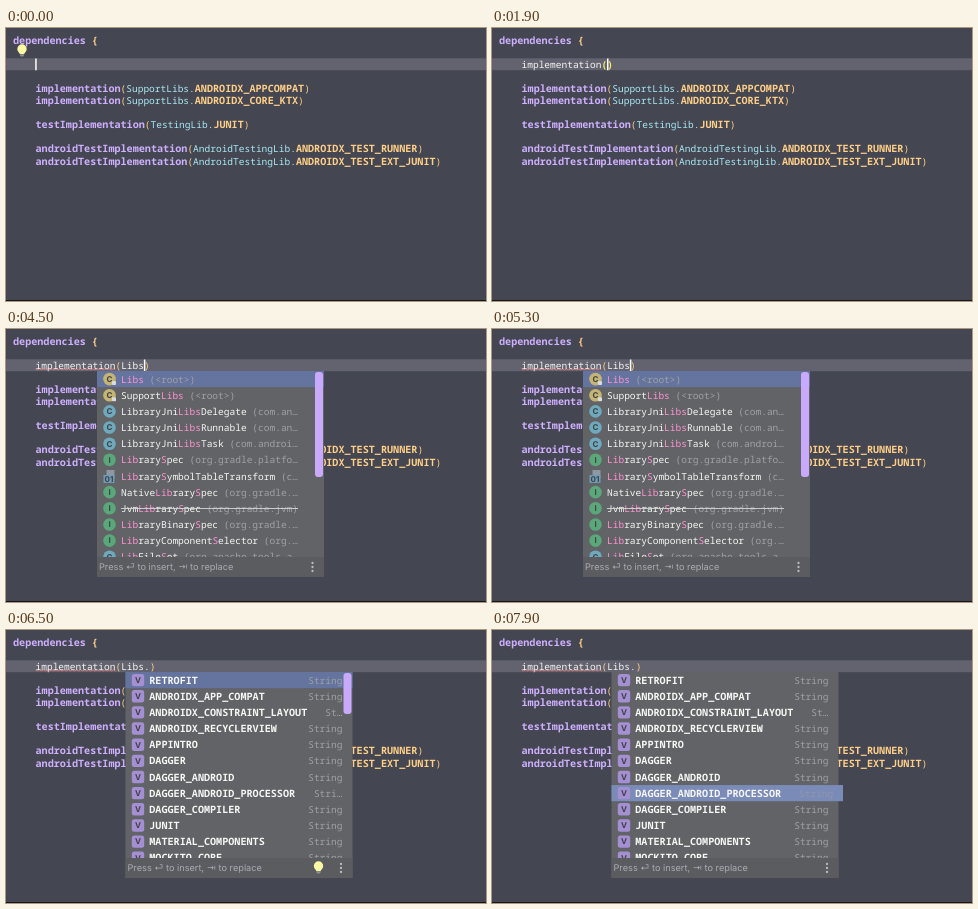
Recreate the animation shown at these times as an HTML page. Size 480 by 273 pixels, loop 8 s.

```html
<!DOCTYPE html>
<html lang="en">
<head>
<meta charset="utf-8">
<title>Dependency completion</title>
<style>
html, body { margin: 0; width: 100%; height: 100%; overflow: hidden; background: #444651; }
svg { display: block; width: 100vw; height: 100vh; }
text { font: 9.53px "Noto Sans Mono", "DejaVu Sans Mono", monospace; white-space: pre; fill: #f6f6f4; text-rendering: geometricPrecision; }
.key { font-size: 10.15px; font-weight: 700; fill: #ceb0ff; }
.type { fill: #a9e9f4; }
.const { font-size: 10.15px; font-weight: 700; fill: #ffcf88; }
.paren { fill: #ffd083; }
.brace { fill: #ffef62; font-weight: 700; }
.item { font-size: 10.15px; font-weight: 700; }
.hit { fill: #ff92d2; }
.dim { fill: #a0a1a4; }
.faint { fill: #8f96ab; }
.hint { font: 9.2px Inter, Roboto, sans-serif; fill: #a9abb0; }
.badge { font: 700 8px Inter, Roboto, sans-serif; text-anchor: middle; fill: #3f4348; }
</style>
</head>
<body>
<svg id="stage" viewBox="0 0 480 273" preserveAspectRatio="none"></svg>
<script>
const LOOP = 8000, STEP = 100;
const CHAR = 5.72, LEFT = 29.5, ROW = 16.15, TOP = 42, LIST_END = 228, WIDE = 227;
const stage = document.getElementById('stage');

const esc = s => s.replace(/&/g, '&amp;').replace(/</g, '&lt;').replace(/>/g, '&gt;');
const span = (cls, s) => `<tspan class="${cls}">${esc(s)}</tspan>`;
const text = (x, y, body, cls = '') => `<text x="${x}" y="${y}" class="${cls}">${body}</text>`;
const rect = (x, y, w, h, fill, more = '') =>
  `<rect x="${x}" y="${y}" width="${w}" height="${h}" fill="${fill}" ${more}/>`;
const group = (id, body, more = '') => `<g id="${id}" ${more}>${body}</g>`;
const baseline = line => 15.5 + 12.1 * line;

function call(line, name, type, constant) {
  return text(LEFT, baseline(line), span('key', name) + span('paren', '(') +
    span('type', type + '.') + span('const', constant) + span('paren', ')'));
}

function bulb(id, x, y) {
  return group(id, `<circle cx="${x}" cy="${y}" r="4.7" fill="#fdf8a4"/>` +
    rect(x - 2.4, y + 3.2, 4.8, 2, '#fdf8a4') + rect(x - 2, y + 5.4, 4, 2, '#8d8f94', 'rx=".8"'));
}

// Popup pieces
function frame(x, height) {
  return rect(x, TOP, WIDE, height, '#616366') + rect(x, TOP + height - 20, WIDE, 20, '#5a5c60');
}

function footer(x, y) {
  const dots = [-4, 0, 4].map(d =>
    `<circle cx="${x + 215.5}" cy="${y + d}" r="1.15" fill="#b9babd"/>`).join('');
  return text(x + 2, y + 3.2, 'Press ⏎ to insert, ⇥ to replace', 'hint') + dots;
}

const selection = x => rect(x, TOP, WIDE, ROW, '#64749f');
const rowMid = i => TOP + ROW * (i + 0.5);
const thumb = (id, x, h) => rect(x + 218, TOP + 1, 8, h, '#c9a9fb', `rx="3" id="${id}"`);

function icon(kind, x, y) {
  if (kind === 'v') return rect(x - 6.2, y - 6.2, 12.4, 12.4, '#a48fd2', 'rx="2.5"') +
    text(x, y + 2.9, 'V', 'badge');
  if (kind === '0') return `<path d="M${x - 3} ${y - 6}h8v8h-8z" fill="#8d98a3"/>` +
    rect(x - 6, y - 1, 11, 8, '#6f9bb5') + text(x - .5, y + 6, '01', 'badge');
  const fill = { C: '#6fa9bd', K: '#c5b574', I: '#5aa779', f: '#b98cc9' }[kind];
  const mark = kind === 'K' ? 'C' : kind;
  return `<circle cx="${x}" cy="${y}" r="6.3" fill="${fill}"/>` + text(x, y + 2.9, mark, 'badge') +
    (kind === 'K' ? rect(x + 2.5, y + 2, 4, 4, '#d9dadc', 'rx=".8"') : '');
}

// Stars enclose matched letters; the tail after the first blank is dimmed.
function suggestion(x, row, i) {
  const kind = row[0], [name, tail] = row.slice(2).split(' ');
  const y = rowMid(i);
  const body = name.split('*').map((s, n) => span(n % 2 ? 'hit' : '', s)).join('');
  return icon(kind, x + 12.5, y) + text(x + 24, y + 3.6, body + span('dim', tail ? ' ' + tail : ''));
}

const clipped = body => `<g clip-path="url(#list)">${body}</g>`;

function classList(id, x, rows, extra = '') {
  return group(id, frame(x, 206) + selection(x) +
    clipped(rows.map((r, i) => suggestion(x, r, i)).join('') + extra) + footer(x, 238));
}

const firstRows = [
  'f *imp*lementation(dependency)', 'f *imp*lementation(group,name)', 'f *imp*ort(path)',
  'C *Imp*ortOrder (org.gradle.…', 'I *Imp*ortSpec (org.gradle.…', 'C *Imp*lSupport (org.gradle.…',
  'I *Imp*ortFilter (org.gradle…', 'C *Imp*lLoader (org.gradle.…', 'I *Imp*licitSpec (org.gradle…',
  'C *Imp*ortTask (org.gradle.…', 'I *Imp*lProvider (org.gradle…', 'C *Imp*ortSet (org.apache.t…'
];
const libRows = [
  'K *Libs* (<root>)', 'K Support*Libs* (<root>)', 'C LibraryJni*Libs*Delegate (com.an…',
  'C LibraryJni*Libs*Runnable (com.an…', 'C LibraryJni*Libs*Task (com.androi…',
  'I *Lib*rary*S*pec (org.gradle.platfo…', '0 *Lib*rary*S*ymbolTableTransform (c…',
  'I Native*Lib*rary*S*pec (org.gradle.…', 'I Jvm*Lib*rary*S*pec (org.gradle.jvm)',
  'I *Lib*raryBinary*S*pec (org.gradle.…', 'I *Lib*raryComponent*S*elector (org.…',
  'C *Lib*File*S*et (org.apache.tools.a…'
];
const fields = ['RETROFIT', 'ANDROIDX_APP_COMPAT', 'ANDROIDX_CONSTRAINT_LAYOUT',
  'ANDROIDX_RECYCLERVIEW', 'APPINTRO', 'DAGGER', 'DAGGER_ANDROID', 'DAGGER_ANDROID_PROCESSOR',
  'DAGGER_COMPILER', 'JUNIT', 'MATERIAL_COMPONENTS', 'MOCKITO_CORE'];
const cut = { 2: 'St…', 7: 'Stri…' };

function fieldRow(name, i) {
  const y = rowMid(i), kind = cut[i] || 'String';
  return icon('v', 132, y) + text(143.3, y + 3.6, name, 'item') +
    text(336.5 - kind.length * CHAR, y + 3.6, kind, 'dim" id="kind' + i);
}

const wave = Array.from({ length: 40 }, (_, i) => `${LEFT + i * 2.05},${i % 2 ? 40.9 : 39.9}`).join(' ');
const spokes = Array.from({ length: 8 }, (_, i) =>
  `<path d="M0-3v-3" stroke="#8fe3a2" stroke-width="1.3" stroke-linecap="round"
    opacity="${0.3 + i * 0.1}" transform="rotate(${i * 45})"/>`).join('');

stage.innerHTML =
  `<clipPath id="list">${rect(0, TOP, 480, LIST_END - TOP, '#000')}</clipPath>` +
  rect(0, 0, 480, 273, '#444651') + rect(0, 30.3, 480, 11.9, '#62636f') +
  text(7, baseline(0), span('key', 'dependencies') + span('', ' ') + span('const', '{')) +
  call(4, 'implementation', 'SupportLibs', 'ANDROIDX_APPCOMPAT') +
  call(5, 'implementation', 'SupportLibs', 'ANDROIDX_CORE_KTX') +
  call(7, 'testImplementation', 'TestingLib', 'JUNIT') +
  call(9, 'androidTestImplementation', 'AndroidTestingLib', 'ANDROIDX_TEST_RUNNER') +
  call(10, 'androidTestImplementation', 'AndroidTestingLib', 'ANDROIDX_TEST_EXT_JUNIT') +
  bulb('lineBulb', 16, 21) +
  `<polyline id="error" points="${wave}" fill="none" stroke="#f08080" stroke-width=".8"/>` +
  `<text id="typed" x="${LEFT}" y="${baseline(2) + .1}"></text>` +
  rect(0, 30.5, 1.5, 11.8, '#fff', 'id="caret"') +
  group('loading', frame(11, 36) + selection(11) + footer(11, 68.5) +
    `<g id="spinner">${spokes}</g>`) +
  classList('first', 11, firstRows) +
  classList('libs', 91, libRows, rect(115, rowMid(8) - .2, 177, .9, '#d5d5d5')) +
  thumb('libThumb', 91, 105) +
  group('fields', frame(119.5, 206) +
    rect(119.5, TOP, WIDE, ROW, '#64749f', 'id="pick"') +
    clipped(fields.map(fieldRow).join('')) + text(0, 0, 'String', 'faint" id="fullKind') +
    footer(119.5, 238) + bulb('listBulb', 312.5, 236)) +
  thumb('fieldThumb', 119.5, 41) +
  rect(0, 272, 480, 1, '#15161a');

const el = {};
stage.querySelectorAll('[id]').forEach(n => el[n.id] = n);
const show = (id, on) => el[id].setAttribute('display', on ? 'inline' : 'none');
const set = (id, attrs) => Object.entries(attrs).forEach(([k, v]) => el[id].setAttribute(k, v));
const fade = (t, from, to) => Math.max(0, Math.min(1, (to - t) / (to - from)));

const keys = [[0, ''], [600, 'i'], [800, 'im'], [900, 'imp'], [1800, 'implementation('],
  [3400, 'implementation(L'], [3600, 'implementation(Li'], [4100, 'implementation(Lib'],
  [4200, 'implementation(Libs'], [6200, 'implementation(Libs.']];
let lastTyped;

function drawTyped(t) {
  const s = keys.filter(k => k[0] <= t).pop()[1];
  set('caret', { x: LEFT - .3 + s.length * CHAR });
  if (s === lastTyped) return;
  lastTyped = s;
  const [name, arg] = s.split('(');
  const cls = arg === '' ? 'brace' : 'paren';
  el.typed.innerHTML = span('', name) +
    (arg === undefined ? '' : span(cls, '(') + span('', arg) + span(cls, ')'));
}

function drawFields(t) {
  const i = Math.max(0, Math.min(7, (t - 7200) / STEP));
  const wide = i in cut;
  set('pick', { y: TOP + i * ROW, width: wide ? 231.5 : WIDE, fill: i ? '#7b8bb8' : '#64749f' });
  for (const k in cut) show('kind' + k, +k !== i);
  show('fullKind', wide);
  set('fullKind', { x: 307, y: rowMid(i) + 3.6 });
  show('listBulb', i === 0);
}

function render(ms) {
  const t = Math.floor(ms % LOOP / STEP) * STEP;
  const during = (a, b) => t >= a && t < b;
  drawTyped(t);
  drawFields(t);
  show('lineBulb', t < 500);
  show('caret', t < 6500);
  show('error', t >= 2600);
  show('loading', during(1000, 1200));
  show('first', during(1200, 1800));
  show('libs', during(4500, 6000));
  show('fields', t >= 6500);
  show('libThumb', during(4500, 5600));
  show('fieldThumb', during(6500, 7300));
  set('libThumb', { opacity: fade(t, 5300, 5600) });
  set('fieldThumb', { opacity: fade(t, 7000, 7300) });
  set('spinner', { transform: `translate(208 68.5) rotate(${t * .45})` });
}

const start = performance.now();
function tick() {
  render(performance.now() - start);
  requestAnimationFrame(tick);
}
tick();
</script>
</body>
</html>
```
